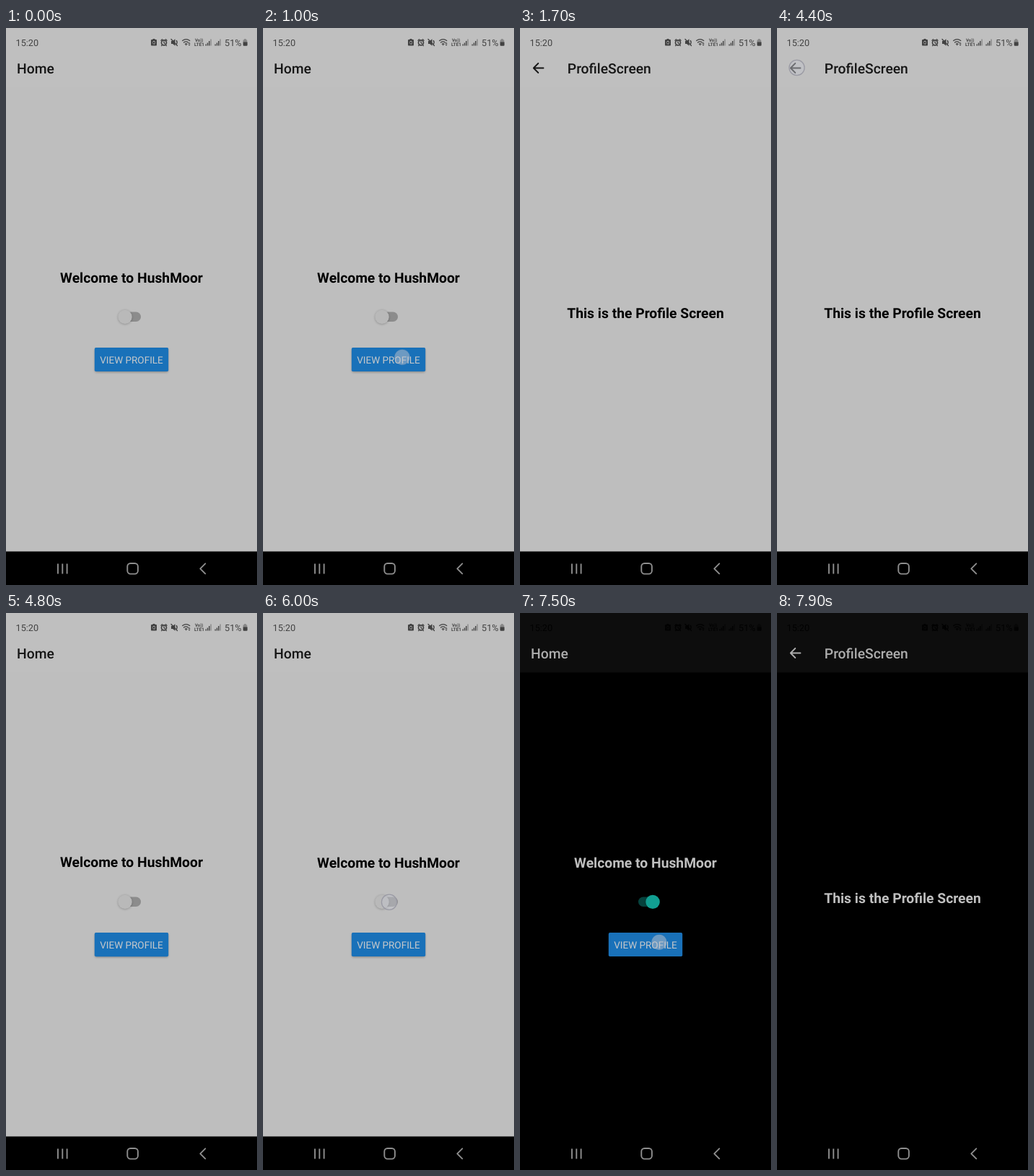
These frames come from a looping animation (348 by 772 pixels, 8000 ms). An HTML page:

```html
<!DOCTYPE html>
<html lang="en">
<head>
<meta charset="utf-8">
<title>Theme switch</title>
<style>
html, body { margin: 0; width: 100%; height: 100%; overflow: hidden; background: #000; }
svg { display: block; width: 100vw; height: 100vh; }
text { font-family: Roboto, sans-serif; text-rendering: geometricPrecision; }
.title { font-size: 19.3px; font-weight: 500; }
.big { font-size: 19.3px; font-weight: 700; text-anchor: middle; }
.line { fill: none; stroke-linecap: round; stroke-linejoin: round; }
</style>
</head>
<body>
<svg viewBox="0 0 348 772" preserveAspectRatio="none">
  <defs>
    <filter id="soft" x="-30%" y="-50%" width="160%" height="220%"><feGaussianBlur stdDeviation="1.5"/></filter>
    <clipPath id="stage"><rect width="348" height="726"/></clipPath>
  </defs>
  <rect id="body" width="348" height="726"/>
  <rect id="header" width="348" height="82.5"/>

  <g id="status">
    <text x="13.5" y="25" font-size="12.7">15:20</text>
    <text x="303" y="25" font-size="12.7">51%</text>
    <path d="M203.500 15h3v1h1.500q1 0 1 1v6.500q0 1-1 1h-6q-1 0-1-1V17q0-1 1-1h1.500z"/>
    <path class="cut line" d="M203.500 19.500l1.500-1.500 1.700 1.500M203.500 21l1.500 1.500 1.700-1.500" stroke-width=".9"/>
    <circle class="ink line" cx="219" cy="20.300" r="3.500" stroke-width="1.700"/>
    <path class="ink line" d="M215 17.200l1.600-1.400M223 17.200l-1.600-1.400M216.300 23.700l-.7 .8M221.700 23.700l.7 .8M219 18.600v2l1.300 .8" stroke-width="1.300"/>
    <path d="M229 18h2.200l3.300-2.800v9.600l-3.300-2.800H229z"/>
    <path class="ink line" d="M229 15.500l8.500 9M236.300 17.500q1.800 2.300 0 5" stroke-width="1.300"/>
    <path class="ink line" d="M244.700 17.600q5-4 10 0M246.500 20q3-2.300 6 0M248.400 22.200q1.300-.9 2.600 0" stroke-width="1.300"/>
    <path d="M248.500 22.800l1.200 1.700 1.200-1.700zM252.600 21.800l1.500-2 1.500 2zM252.600 22.800l1.500 2 1.500-2z"/>
    <text x="262" y="19" font-size="6" font-weight="700">Vo))</text>
    <text x="261" y="25.300" font-size="6.300" font-weight="700">LTE1</text>
    <g id="bars"><path d="M276.500 22.500h1.400v2h-1.400zM278.800 20.500h1.400v4h-1.400zM281.100 18h1.400v6.500h-1.400z"/><path opacity=".45" d="M283.400 15.500h1.400v9h-1.400z"/></g>
    <use href="#bars" x="13"/>
    <path opacity=".45" d="M330 15.300h3v1.200h1.300v3.500h-5.600v-3.500h1.300z"/>
    <path d="M328.700 19.500h6v4q0 1.200-1.200 1.200h-3.600q-1.200 0-1.200-1.200z"/>
  </g>

  <g clip-path="url(#stage)">
    <g id="home">
      <text class="title tint" x="15" y="63.400">Home</text>
      <text class="big strong" x="174" y="352.500">Welcome to HushMoor</text>
      <rect id="track" x="157" y="393.500" width="30" height="13.500" rx="6.750"/>
      <circle id="thumbShade" cy="401" r="10" fill="#000" opacity=".22" filter="url(#soft)"/>
      <circle id="thumb" cy="400.400" r="9.700"/>
      <rect id="shade" x="123.300" y="444.800" width="101.400" height="32.500" rx="2" fill="#000" opacity=".28" filter="url(#soft)"/>
      <rect x="122.800" y="443.100" width="102.400" height="33" rx="1.800" fill="#1971b9"/>
      <text x="174" y="465" font-size="13.530" text-anchor="middle" fill="#c6c8ca">VIEW PROFILE</text>
    </g>
    <g id="profile">
      <path class="line tintLine" d="M19 55.500H32.500M25.300 49L18.800 55.500L25.300 62" stroke-width="1.800"/>
      <text class="title tint" x="65.800" y="63.300">ProfileScreen</text>
      <text class="big strong" x="174" y="402.200">This is the Profile Screen</text>
    </g>
    <circle id="touch" r="10.600" fill="#c2c4cc" fill-opacity=".5" stroke="#9a9aa4" stroke-width="1.300"/>
  </g>

  <rect y="725.500" width="348" height="46.500" fill="#000"/>
  <g class="line" stroke="#8e8e8e" stroke-width="1.900">
    <path d="M72 742.500v14M78.300 742.500v14M84.600 742.500v14" stroke-linecap="butt"/>
    <rect x="168.300" y="742" width="14.600" height="14.600" rx="4.300"/>
    <path d="M276.300 742.300L269.300 749.300L276.300 756.300"/>
  </g>
</svg>
<script>
const LOOP = 8000, STEP = 100, DARK_AT = 6100;
const $ = id => document.getElementById(id);
const set = (el, attrs) => { for (const k in attrs) el.setAttribute(k, attrs[k]); };
const each = (sel, attrs) => document.querySelectorAll(sel).forEach(el => set(el, attrs));
const clamp = x => Math.max(0, Math.min(1, x));
const ramp = (t, from, len) => clamp((t - from) / len);
const mix = (a, b, p) => a + (b - a) * p;
const easeOut = p => 1 - Math.pow(1 - p, 4);

// Screen changes: the deeper screen grows in, the one beneath zooms past.
const moves = [
  { at: 1150, to: 1, len: 350 },
  { at: 4550, to: 0, len: 350 },
  { at: 7550, to: 1, len: 350 }
];
const touches = [
  { at: 1000, off: 1250, x: 193, y: 456.300, rim: 0.1 },
  { at: 4400, off: 4650, x: 27.500, y: 55, rim: 1 },
  { at: 6000, off: 6180, x: 175, y: 400.700, rim: 1 },
  { at: 7500, off: 7700, x: 193, y: 456.300, rim: 0.1 }
];

function place(id, alpha, scale) {
  set($(id), {
    opacity: alpha,
    display: alpha > 0 ? "inline" : "none",
    transform: `translate(174 386) scale(${scale}) translate(-174 -386)`
  });
}

function screens(t) {
  const m = moves.filter(m => t >= m.at).pop();
  if (!m) { place("home", 1, 1); place("profile", 0, 1); return; }
  const p = easeOut(ramp(t, m.at, m.len));
  const seen = ramp(t, m.at + 20, 70);
  if (m.to) {
    place("home", 1 - seen, mix(1, 1.1, p));
    place("profile", seen, mix(0.88, 1, p));
  } else {
    place("home", seen, mix(1.06, 1, p));
    place("profile", 1 - seen, mix(1, 0.92, p));
  }
}

function theme(dark) {
  const tint = dark ? "#adadad" : "#151515";
  const ink = dark ? "#020202" : "#424242";
  set($("body"), { fill: dark ? "#000" : "#bebebe" });
  set($("header"), { fill: dark ? "#0d0d0d" : "#bfbfbf" });
  set($("status"), { fill: ink });
  each(".ink", { stroke: ink });
  each(".cut", { stroke: dark ? "#0d0d0d" : "#bfbfbf" });
  each(".tint", { fill: tint });
  each(".tintLine", { stroke: tint });
  each(".strong", { fill: dark ? "#bfbfbf" : "#000" });
  set($("track"), { fill: dark ? "#06423d" : "#8c8c8c", x: dark ? 164 : 157 });
  set($("thumb"), { fill: dark ? "#119f92" : "#b9b9b9", cx: dark ? 184 : 165 });
  set($("thumbShade"), { cx: dark ? 184 : 165 });
  set($("shade"), { opacity: dark ? 0 : 0.28 });
}

function touch(t) {
  const d = touches.find(d => t >= d.at && t < d.off);
  if (!d) { set($("touch"), { opacity: 0 }); return; }
  set($("touch"), {
    cx: d.x, cy: d.y,
    opacity: 1 - ramp(t, d.at + 60, d.off - d.at - 60) * 0.9,
    "stroke-opacity": t >= DARK_AT ? 0 : d.rim
  });
}

function draw(time) {
  const t = Math.floor(time % LOOP / STEP) * STEP;
  theme(t >= DARK_AT);
  screens(t);
  touch(t);
}

const start = performance.now();
function tick() {
  draw(performance.now() - start + 17);
  requestAnimationFrame(tick);
}
tick();
</script>
</body>
</html>
```
